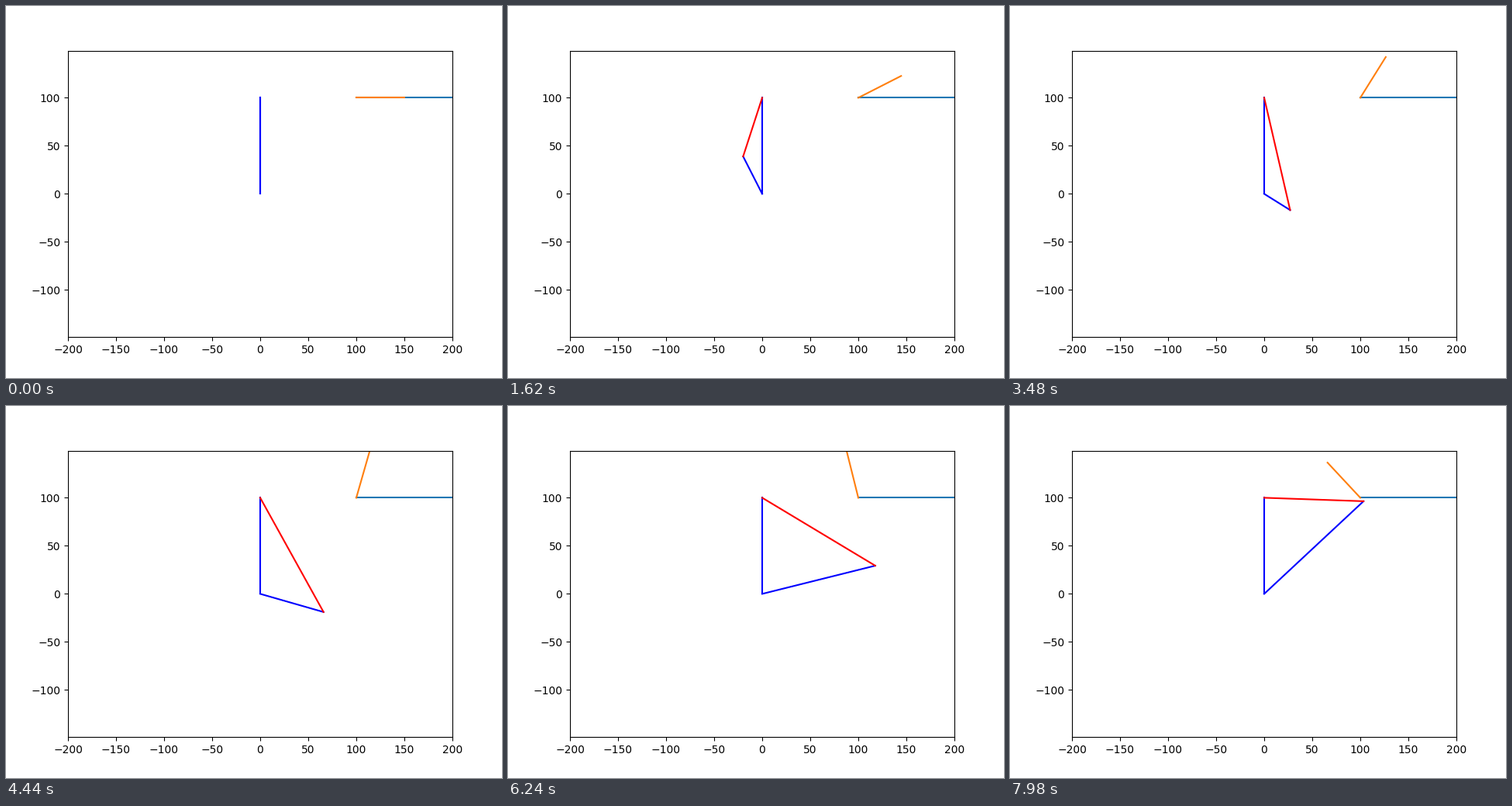
A matplotlib script that plays this animation: 640x480 px, repeating every 8000 ms.

```python
import numpy as np
import matplotlib.pyplot as plt
from matplotlib.animation import FuncAnimation

TICK = 20            # ms per drawn frame
LOOP = 8000          # ms per loop
STEP = 60            # ms per degree of rotation
SIDE = 100           # height of the fixed bar
ARM = 50             # length of the rotating pointer
HALF_X = 200

fig, ax = plt.subplots(figsize=(6.4, 4.8), dpi=100)

# equal scale on both axes
box = ax.get_position()
half_y = HALF_X * (box.height * 4.8) / (box.width * 6.4)
ax.set_xlim(-HALF_X, HALF_X)
ax.set_ylim(-half_y, half_y)

ax.plot([SIDE, 2.5 * SIDE], [SIDE, SIDE], color="tab:blue")
pointer, = ax.plot([], [], color="tab:orange")
ax.plot([0, 0], [0, SIDE], color="blue")
crank, = ax.plot([], [], color="blue")
link, = ax.plot([], [], color="red")


def update(i):
    angle = np.radians(i * TICK // STEP)
    c, s = np.cos(angle), np.sin(angle)

    pointer.set_data([SIDE, SIDE + ARM * c], [SIDE, SIDE + ARM * s])

    # the crank is perpendicular to the pointer, with a signed length
    reach = SIDE * (s - c)
    x, y = reach * s, -reach * c
    crank.set_data([0, x], [0, y])
    link.set_data([0, x], [SIDE, y])
    return pointer, crank, link


anim = FuncAnimation(fig, update, frames=LOOP // TICK, interval=TICK,
                     repeat=True, repeat_delay=0, blit=False)
plt.show()
```
